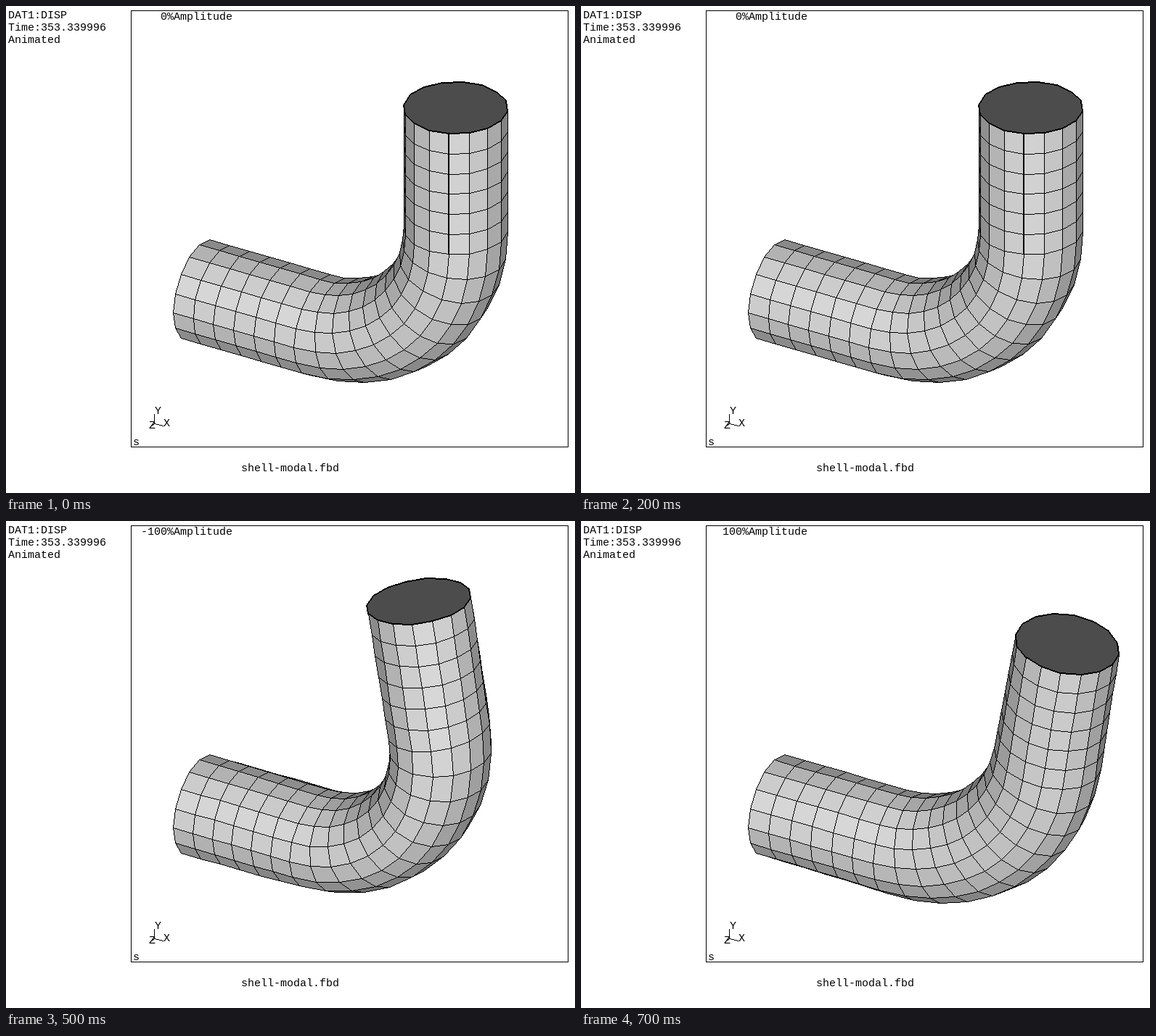
An HTML page with a canvas for the animation above (800 ms loop, 784x672 px).

```html
<!DOCTYPE html>
<html lang="en">
<head>
<meta charset="utf-8">
<title>shell-modal</title>
<style>
  html, body { margin: 0; width: 100%; height: 100%; overflow: hidden; background: #fff; }
  canvas, svg { position: absolute; left: 0; top: 0; display: block; }
  text { font: 15px "Liberation Mono", "DejaVu Sans Mono", monospace; fill: #000; white-space: pre; }
  .line { fill: none; stroke: #000; stroke-width: 1; shape-rendering: crispEdges; }
</style>
</head>
<body>
<canvas id="view" width="784" height="672"></canvas>
<svg width="784" height="672" viewBox="0 0 784 672">
  <rect class="line" x="172.5" y="6.5" width="602" height="602"/>
  <text x="3" y="17">DAT1:DISP</text>
  <text x="3" y="34">Time:353.339996</text>
  <text x="3" y="51">Animated</text>
  <text id="label" x="312" y="19" text-anchor="end">0%Amplitude</text>
  <text x="175" y="606">s</text>
  <text x="324" y="642">shell-modal.fbd</text>
  <path class="line" d="M204.5 563V576.5L217.5 579.5M204.5 576.5L199 580.5"/>
  <text x="205" y="563">Y</text>
  <text x="217" y="580">X</text>
  <text x="197" y="583">Z</text>
</svg>
<script>
const W = 784, H = 672;
const RADIUS = 72, BEND = 216, LEG = 192;
const AROUND = 16, LEG_CELLS = 6, BEND_CELLS = 10;
const ARC = BEND * Math.PI / 2, LENGTH = 2 * LEG + ARC;
const EYE = [0.433, 0.5, 0.75];
const STEP = 100, CYCLE = [0, -1, 0, 1];

// Along the pipe, as [arc length, value]: section rotation, shift along x, warp of the flanks
const TURN = [[0, 0], [LEG, 0.018], [LEG + ARC, 0.165], [LENGTH, 0.166]];
const SHIFT = [[0, 0], [LEG, 2.5], [LENGTH, 2.5]];
const WARP = [[0, 0], [LEG, 2.5], [LEG + ARC, 0], [LENGTH, 0]];
const OVAL = 6;

const sub = (a, b) => a.map((v, i) => v - b[i]);
const dot = (a, b) => a[0] * b[0] + a[1] * b[1] + a[2] * b[2];
const cross = (a, b) => [
  a[1] * b[2] - a[2] * b[1],
  a[2] * b[0] - a[0] * b[2],
  a[0] * b[1] - a[1] * b[0]
];

function at(table, s) {
  let i = 1;
  while (i < table.length - 1 && s > table[i][0]) i++;
  const [s0, a0] = table[i - 1], [s1, a1] = table[i];
  return a0 + (a1 - a0) * (s - s0) / (s1 - s0);
}

const bendAt = s => Math.min(Math.max((s - LEG) / BEND, 0), Math.PI / 2);

function stations() {
  const list = [0];
  const add = (count, size) => {
    for (let i = 0; i < count; i++) list.push(list[list.length - 1] + size);
  };
  add(LEG_CELLS, LEG / LEG_CELLS);
  add(BEND_CELLS, ARC / BEND_CELLS);
  add(LEG_CELLS, LEG / LEG_CELLS);
  return list;
}

function ring(s, x, y, u, v, amp) {
  const b = bendAt(s), nx = Math.sin(b), ny = -Math.cos(b);
  const turn = amp * at(TURN, s), warp = amp * at(WARP, s);
  const oval = amp * OVAL * Math.sin(Math.PI * s / LENGTH) ** 2;
  const cx = x + amp * (u + at(SHIFT, s)), cy = y + amp * v;
  return Array.from({ length: AROUND }, (_, k) => {
    const p = k * 2 * Math.PI / AROUND, c = Math.cos(p), z = Math.sin(p);
    const out = oval * Math.cos(2 * p), side = -oval / 2 * Math.sin(2 * p);
    const r = RADIUS * c + out * c - side * z;
    const along = warp * z * z - turn * RADIUS * c;
    return [
      cx + r * nx - along * ny,
      cy + r * ny + along * nx,
      RADIUS * z + out * z + side * c
    ];
  });
}

// Walk the centre line, summing its path and its displacement.
function pipe(amp) {
  let x = 0, y = 0, u = 0, v = 0, last = 0;
  return stations().map(s => {
    const n = 20, ds = (s - last) / n;
    for (let i = 0; i < n; i++) {
      const m = last + (i + 0.5) * ds, b = bendAt(m), t = at(TURN, m);
      const dx = Math.cos(b) * ds, dy = Math.sin(b) * ds;
      x += dx;
      y += dy;
      u += t * dy;
      v -= t * dx;
    }
    last = s;
    return ring(s, x, y, u, v, amp);
  });
}

const project = ([x, y, z]) => [
  Math.round(266 + 0.866 * x - 0.5 * z),
  Math.round(391.8 + 0.25 * x - 0.866 * y + 0.433 * z)
];

function fill(ctx, pts, color) {
  ctx.fillStyle = color;
  ctx.beginPath();
  pts.forEach(([x, y]) => ctx.lineTo(x + 0.5, y + 0.5));
  ctx.fill();
}

// Hard-edged line, the same pixels whichever way it is drawn.
function line(ctx, a, b, width = 1) {
  if (a[0] > b[0] || (a[0] === b[0] && a[1] > b[1])) [a, b] = [b, a];
  const dx = b[0] - a[0], dy = b[1] - a[1];
  const n = Math.max(Math.abs(dx), Math.abs(dy), 1);
  const steep = Math.abs(dy) > Math.abs(dx);
  ctx.fillStyle = "#000";
  for (let i = 0; i <= n; i++) {
    const x = Math.round(a[0] + dx * i / n), y = Math.round(a[1] + dy * i / n);
    if (steep) ctx.fillRect(x + 1 - width, y, width, 1);
    else ctx.fillRect(x, y + 1 - width, 1, width);
  }
}

function outline(ctx, pts, width) {
  pts.forEach((p, i) => line(ctx, p, pts[(i + 1) % pts.length], width));
}

function render(amp) {
  const canvas = document.createElement("canvas");
  canvas.width = W;
  canvas.height = H;
  const ctx = canvas.getContext("2d");
  const rings = pipe(amp), faces = [];
  for (let i = 0; i + 1 < rings.length; i++) {
    for (let k = 0; k < AROUND; k++) {
      const j = (k + 1) % AROUND;
      const quad = [rings[i][k], rings[i + 1][k], rings[i + 1][j], rings[i][j]];
      const normal = cross(sub(quad[2], quad[0]), sub(quad[3], quad[1]));
      const light = dot(normal, EYE) / Math.hypot(...normal);
      if (light <= 0) continue;
      const depth = quad.reduce((sum, p) => sum + dot(p, EYE), 0);
      faces.push({ pts: quad.map(project), light, depth });
    }
  }
  faces.sort((a, b) => a.depth - b.depth);
  for (const { pts, light } of faces) {
    const g = Math.round(92 + 135 * light);
    fill(ctx, pts, `rgb(${g},${g},${g})`);
    outline(ctx, pts);
  }
  // The seam falls on a pixel boundary when the leg stands upright.
  if (amp === 0) line(ctx, project(rings[LEG_CELLS + BEND_CELLS][3]), project(rings[rings.length - 1][3]), 2);
  const mouth = rings[rings.length - 1].map(project);
  fill(ctx, mouth, "#4c4c4c");
  outline(ctx, mouth, 2);
  return canvas;
}

const view = document.getElementById("view").getContext("2d");
const label = document.getElementById("label");
const poses = new Map([-1, 0, 1].map(amp => [amp, render(amp)]));
const start = performance.now();
let shown = null;

function show(amp) {
  if (amp === shown) return;
  shown = amp;
  view.clearRect(0, 0, W, H);
  view.drawImage(poses.get(amp), 0, 0);
  label.textContent = amp * 100 + "%Amplitude";
}

function tick() {
  const t = Math.max(performance.now() - start, 0);
  show(CYCLE[Math.floor(t / STEP) % CYCLE.length]);
  requestAnimationFrame(tick);
}
tick();
</script>
</body>
</html>
```
